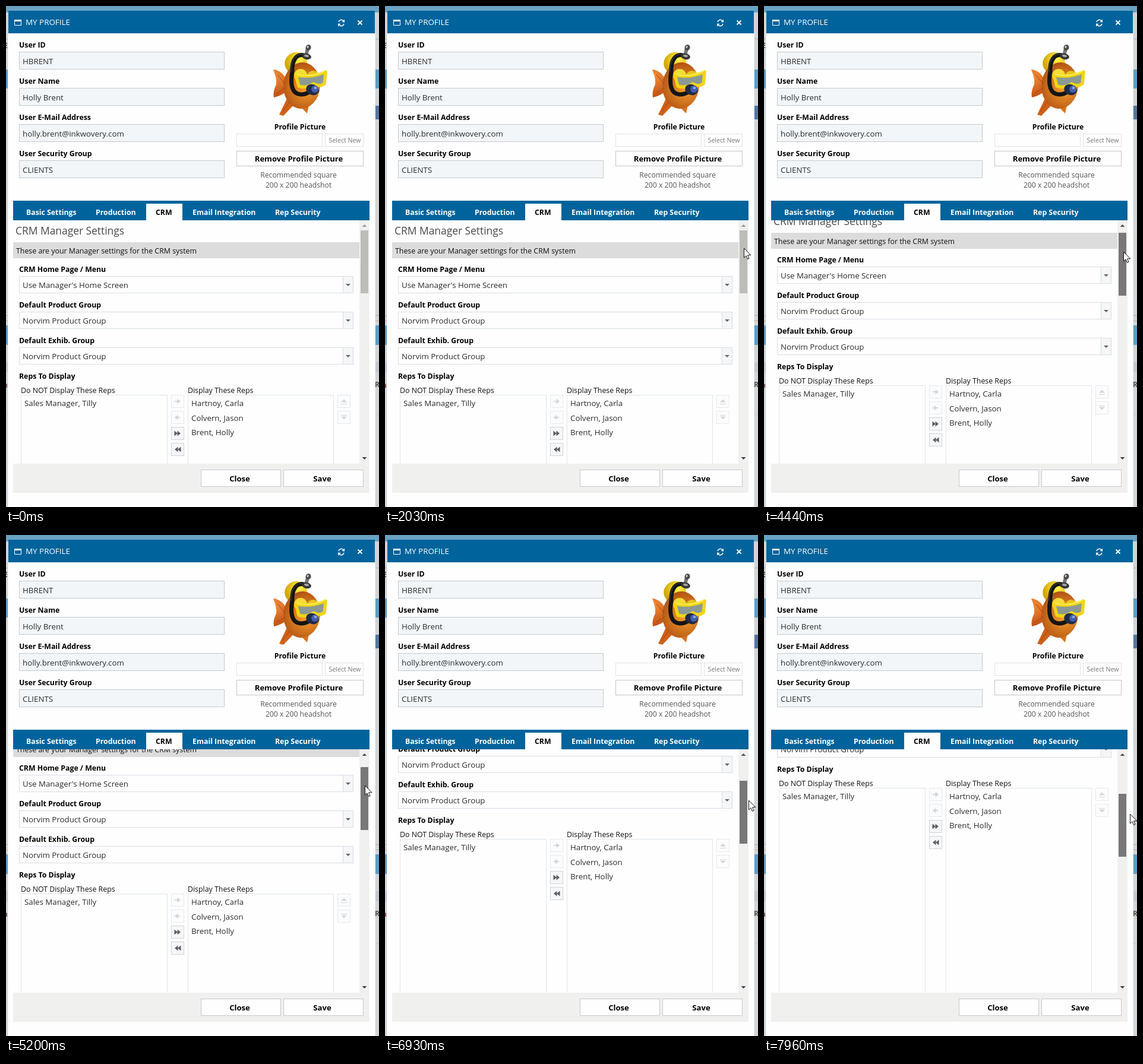
Write an HTML page with a canvas that moves like this. It is 628x844 px and loops after 8 s.

```html
<!DOCTYPE html>
<html lang="en">
<head>
<meta charset="utf-8">
<title>My Profile</title>
<style>
html, body { margin: 0; width: 100%; height: 100%; overflow: hidden; background: #fefefe; }
canvas { display: block; width: 628px; height: 844px; }
</style>
</head>
<body>
<canvas id="stage" width="628" height="844"></canvas>
<script>
const g = document.getElementById('stage').getContext('2d');
const LOOP = 8000, BLUE = '#00639b';

// [time, scroll offset]
const SCROLL = [[3430, 0], [3550, 8], [3990, 8], [4130, 16], [4440, 16], [5200, 51], [5270, 52],
  [5820, 81], [5950, 81], [6170, 94], [6750, 132], [6790, 134], [6930, 143], [7580, 197], [7960, 229]];
// [time, x, y] of the pointer tip
const POINTER = [[1170, 622, 376], [1235, 603, 394], [1340, 610, 423], [1640, 610, 423], [2030, 604, 408],
  [3430, 604, 408], [3550, 604, 410], [3990, 604, 410], [4130, 604, 413], [4440, 605, 414],
  [5200, 604, 422], [5820, 607, 430], [5950, 607, 430], [6170, 608, 433], [6930, 612, 447], [7960, 616, 470]];

function at(keys, t) {
  let i = 0;
  while (i < keys.length - 1 && keys[i + 1][0] <= t) i++;
  const a = keys[i], b = keys[Math.min(i + 1, keys.length - 1)];
  const k = a === b ? 0 : Math.max(0, (t - a[0]) / (b[0] - a[0]));
  return a.slice(1).map((v, j) => Math.round(v + (b[j + 1] - v) * k));
}

function rect(x, y, w, h, fill) {
  g.fillStyle = fill;
  g.fillRect(x, y, w, h);
}

function box(x, y, w, h, fill, line) {
  rect(x, y, w, h, line);
  rect(x + 1, y + 1, w - 2, h - 2, fill);
}

function text(s, x, y, size = 13.3, color = '#2b2b2b', weight = 400, align = 'left') {
  g.font = `${weight} ${size}px "Open Sans", "Noto Sans", sans-serif`;
  g.fillStyle = color;
  g.textAlign = align;
  g.fillText(s, x, y);
}

const label = (s, x, y) => text(s, x, y, 12.3, '#000', 700);

function shape(fill, points) {
  g.fillStyle = fill;
  g.beginPath();
  points.forEach(([x, y]) => g.lineTo(x, y));
  g.closePath();
  g.fill();
}

function oval(x, y, rx, ry, turn, fill) {
  g.fillStyle = fill;
  g.beginPath();
  g.ellipse(x, y, rx, ry, turn, 0, 7);
  g.fill();
}

function stroke(d, color, width) {
  g.strokeStyle = color;
  g.lineWidth = width;
  g.stroke(new Path2D(d));
}

// Small triangle centred on x, y; dir is 1 for down, -1 for up
const caret = (x, y, dir, color, r = 4) =>
  shape(color, [[x - r, y - dir * r / 2], [x + r, y - dir * r / 2], [x, y + dir * r / 2]]);

function glow(x, y, r, inner, outer) {
  const fill = g.createRadialGradient(x, y, 1, x, y, r);
  fill.addColorStop(0, inner);
  fill.addColorStop(1, outer);
  return fill;
}

function drawPage() {
  rect(0, 0, 628, 844, '#d3d4d6');
  rect(0, 0, 628, 11, '#6aa2c4');
  for (const x of [0, 621]) {
    rect(x, 55, 7, 1, '#a9acb4');
    rect(x, 107, 7, 32, '#5c9cc4');
    rect(x, 521, 7, 1, '#a9a9b0');
    rect(x, 530, 7, 1, '#bfa9a9');
    rect(x, 538, 7, 33, '#5c9cc4');
    rect(x, 600, 7, 17, '#c3c8ce');
    rect(x, 688, 7, 1, '#c4c8cc');
  }
  rect(621, 168, 7, 23, '#5577a0');
  text('E', -4, 71, 12, '#444', 700);
  text('n', -5, 643, 12, '#8a4a4a', 700);
  text('R', 621, 642, 12, '#555', 700);
}

function drawHeader() {
  rect(3, 46, 619, 798, '#e9f3f8');
  rect(4, 8, 617, 836, '#fefefe');
  rect(4, 8, 617, 38, BLUE);
  g.lineCap = 'butt';
  stroke('M14.5 23.5H25.5V32.5H14.5Z', '#fff', 1);
  rect(14, 23, 12, 3, '#fff');
  text('MY PROFILE', 33, 32, 13.4, '#fff');
  stroke('M560 27A4.6 4.6 0 0 1 568 25M569 30A4.6 4.6 0 0 1 561 32', '#fff', 1.5);
  shape('#fff', [[570, 22.5], [570, 27.5], [565.5, 27]]);
  shape('#fff', [[559, 34.5], [559, 29.5], [563.5, 30]]);
  stroke('M592.5 24.5L599.5 31.5M599.5 24.5L592.5 31.5', '#fff', 1.8);
}

function drawFish() {
  g.lineCap = g.lineJoin = 'round';
  g.fillStyle = glow(454, 118, 40, '#f08a35', '#b9490f');
  g.fill(new Path2D('M476 131Q466 108 450 107Q456 122 455 132Q449 144 451 154Q466 151 476 140Z'));
  shape('#cf6219', [[474, 154], [460, 183], [467, 185], [488, 163]]);
  shape('#d9731e', [[490, 164], [507, 181], [512, 158]]);
  oval(488, 96, 19, 18, -0.5, glow(494, 90, 24, '#fff04a', '#d2a600'));
  oval(498, 134, 31, 39, 0.08, glow(506, 138, 46, '#f8a02e', '#ad4d10'));
  stroke('M457 116L470 131M456 147L470 138M466 178L477 162', '#a74211', 1);
  oval(496, 117, 11, 11, 0, '#f4dd35');
  oval(517, 118, 10, 9, 0, '#e9c61c');
  oval(497, 121, 5, 6, 0, '#26261f');
  oval(518, 121, 4, 5, 0, '#26261f');
  stroke('M505 84C489 78 481 92 482 110C478 134 482 148 496 149Q506 149 511 144', '#151515', 7);
  stroke('M503 82C489 77 479 92 480 110', '#4d4d4d', 1);
  stroke('M508 71L505 84', '#777', 6);
  oval(509, 70, 4.5, 5, 0.3, '#4b4b4b');
  oval(508, 69, 1.5, 2, 0.3, '#ccc');
  oval(506, 85, 8, 5, 0.2, '#373737');
  oval(506, 84, 4, 2, 0.2, '#a3a3a3');
  const mask = 'M488 116Q512 122 538 111L536 131Q527 137 518 131Q508 139 493 135Z';
  g.fillStyle = '#8b9a94';
  g.fill(new Path2D(mask));
  stroke(mask, '#f1d514', 5.5);
  stroke('M490 115Q512 121 536 110', '#fff36c', 1.4);
  oval(516, 141, 11, 9, 0.3, '#202b46');
  oval(520, 140, 6, 6, 0, '#435fae');
  oval(521, 138, 2.5, 2, 0, '#91a8df');
}

function drawProfile() {
  const fields = [['User ID', 'HBRENT'], ['User Name', 'Holly Brent'],
    ['User E-Mail Address', 'holly.brent@inkwovery.com'], ['User Security Group', 'CLIENTS']];
  fields.forEach(([name, value], i) => {
    const y = 77 + 61 * i;
    label(name, 22, y - 7);
    box(22, y, 346, 30, '#f2f6f9', '#c4c9ce');
    text(value, 28, y + 21);
  });
  drawFish();
  text('Profile Picture', 495, 208, 12.2, '#000', 700, 'center');
  box(388, 215, 145, 22, '#fefefe', '#dfe3e8');
  box(537, 215, 65, 22, '#fefefe', '#dfe3e8');
  text('Select New', 570.5, 230, 10.6, '#777', 400, 'center');
  box(388, 244, 214, 26, '#fefefe', '#c2c5c8');
  text('Remove Profile Picture', 493, 262, 13.1, '#000', 700, 'center');
  text('Recommended square', 492.5, 289, 12.2, '#555', 400, 'center');
  text('200 x 200 headshot', 492.5, 306, 12.2, '#555', 400, 'center');
}

function drawTabs() {
  rect(12, 328, 600, 33, BLUE);
  rect(236, 333, 61, 28, '#fefefe');
  [['Basic Settings', 34], ['Production', 151], ['CRM', 252], ['Email Integration', 314], ['Rep Security', 453]]
    .forEach(([s, x]) => text(s, x, 352, 12.3, s === 'CRM' ? '#000' : '#fff', 700));
}

function combo(name, value, y) {
  label(name, 22, y - 7);
  box(22, y, 563, 29, '#fefefe', '#d8dde3');
  box(567, y, 18, 29, '#f4f6f8', '#d8dde3');
  caret(576, y + 15, 1, '#666');
  text(value, 28, y + 20);
}

function moveButton(x, y, icon, enabled) {
  box(x, y, 22, 22, enabled ? '#f6f7f9' : '#fbfcfd', enabled ? '#cfd3d8' : '#e6e9ed');
  const color = enabled ? '#5a5d62' : '#d3d7db', cx = x + 11, cy = y + 11;
  if (icon === 'up' || icon === 'down') {
    const dir = icon === 'up' ? -1 : 1;
    caret(cx, cy + dir, dir, color, 5);
    rect(cx - 5, cy - dir * 4, 10, 1, color);
    return;
  }
  const dir = icon.includes('>') ? 1 : -1;
  const head = x0 => shape(color, [[x0 - dir * 3, cy - 4.5], [x0 + dir * 2.5, cy], [x0 - dir * 3, cy + 4.5]]);
  if (icon.length === 2) {
    head(cx - 2.5);
    head(cx + 2.5);
  } else {
    rect(cx - 5, cy - 1, 9, 2, color);
    head(cx + dir * 2.5);
  }
}

function repList(title, names, x, w) {
  text(title, x, 652, 12.35, '#111');
  box(x, 655, w, 500, '#fefefe', '#dfe5e9');
  names.forEach((s, i) => text(s, x + 6, 674 + Math.round(24.5 * i)));
}

function drawSettings(scroll) {
  g.save();
  g.beginPath();
  g.rect(12, 361, 583, 410);
  g.clip();
  g.translate(0, -scroll);
  text('CRM Manager Settings', 16, 385, 17.4, '#4a4a4a');
  rect(12, 398, 583, 27, '#dcdcdc');
  text('These are your Manager settings for the CRM system', 17, 417, 12.36, '#111');
  combo('CRM Home Page / Menu', "Use Manager's Home Screen", 455);
  combo('Default Product Group', 'Norvim Product Group', 515);
  combo('Default Exhib. Group', 'Norvim Product Group', 575);
  label('Reps To Display', 22, 628);
  repList('Do NOT Display These Reps', ['Sales Manager, Tilly'], 25, 247);
  repList('Display These Reps', ['Hartnoy, Carla', 'Colvern, Jason', 'Brent, Holly'], 306, 246);
  ['>', '<', '>>', '<<'].forEach((icon, i) => moveButton(278, 655 + 27 * i, icon, i > 1));
  ['up', 'down'].forEach((icon, i) => moveButton(558, 655 + 27 * i, icon, false));
  g.restore();
}

function drawScrollbar(scroll, pressed) {
  rect(595, 361, 17, 410, '#f0f0ef');
  caret(603.5, 370, -1, scroll ? '#505050' : '#9a9a9a');
  caret(603.5, 762, 1, '#404040');
  rect(597, 378 + Math.round(scroll * 0.254), 13, 106, pressed ? '#787878' : '#bdbdb8');
}

function drawFooter() {
  rect(12, 771, 600, 49, '#f0f0ef');
  [['Close', 328], ['Save', 467]].forEach(([s, x]) => {
    box(x, 781, 135, 29, '#fefefe', '#c6c9cb');
    text(s, x + 65.5, 801, 13.1, '#000', 700, 'center');
  });
}

function drawPointer(x, y) {
  const p = new Path2D();
  const arrow = 'M.5 .5V16L4 12.7L6.5 18.4L9 17.3L6.6 11.8H11.5Z';
  p.addPath(new Path2D(arrow), new DOMMatrix([1, 0, 0, 1, x, y]));
  g.fillStyle = '#fff';
  g.fill(p);
  g.lineJoin = 'miter';
  g.strokeStyle = '#111';
  g.lineWidth = 1;
  g.stroke(p);
}

function draw(now) {
  const t = now % LOOP;
  const [scroll] = at(SCROLL, t);
  drawPage();
  drawHeader();
  drawProfile();
  drawSettings(scroll);
  drawTabs();
  drawScrollbar(scroll, t >= 3130);
  drawFooter();
  if (t >= POINTER[0][0]) drawPointer(...at(POINTER, t));
  requestAnimationFrame(draw);
}
requestAnimationFrame(draw);
</script>
</body>
</html>
```
